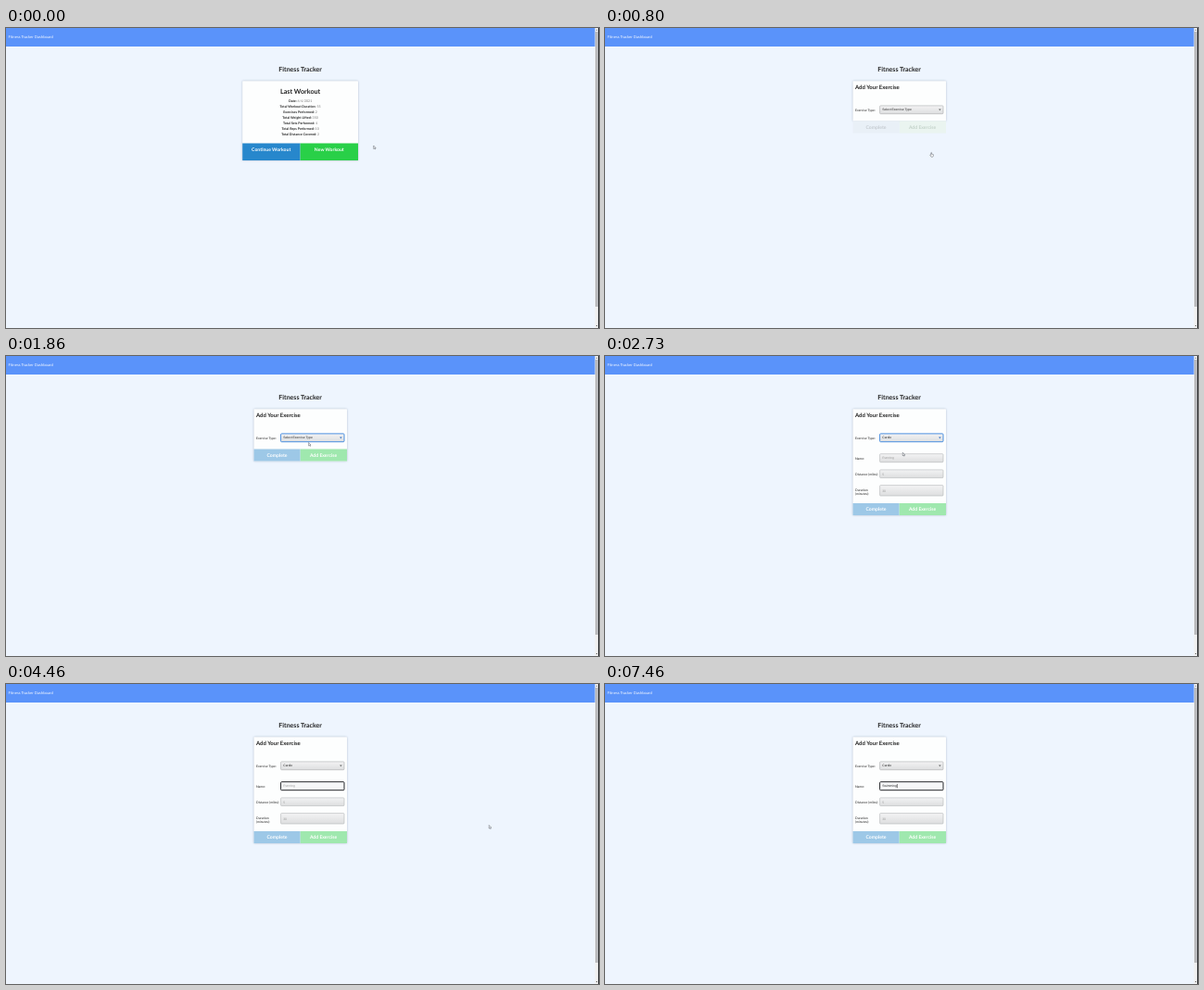
These frames come from a looping animation (640x324 px, 8 s). An HTML page:

```html
<!DOCTYPE html>
<html lang="en">
<head>
<meta charset="utf-8">
<title>Fitness Tracker</title>
<style>
  html, body { margin: 0; width: 100%; height: 100%; overflow: hidden; background: #eef5fe; }
  svg { display: block; width: 640px; height: 324px; }
  text { font-family: Lato, sans-serif; text-rendering: geometricPrecision; white-space: pre; }
  .field { font-family: "Liberation Sans", Arial, sans-serif; }
  .card { filter: drop-shadow(0 .4px .8px rgba(60, 80, 110, .35)); }
</style>
</head>
<body>
<svg id="stage" viewBox="0 0 640 324">
  <defs>
    <linearGradient id="shade" x2="0" y2="1">
      <stop stop-color="#f3f3f4"/><stop offset="1" stop-color="#dddedf"/>
    </linearGradient>
  </defs>
</svg>
<script>
const LOOP = 8000;
const stage = document.getElementById('stage');

function add(parent, tag, attrs, content) {
  const el = document.createElementNS('http://www.w3.org/2000/svg', tag);
  set(el, attrs);
  if (content !== undefined) el.textContent = content;
  parent.appendChild(el);
  return el;
}
function set(el, attrs) {
  for (const key in attrs) el.setAttribute(key, attrs[key]);
}
function show(el, on) {
  el.style.display = on ? '' : 'none';
}
const group = (parent, attrs = {}) => add(parent, 'g', attrs);
const rect = (parent, x, y, width, height, fill, more = {}) =>
  add(parent, 'rect', { x, y, width, height, fill, ...more });

// y is the middle of the capital letters
const label = (parent, x, y, size, str, more = {}) =>
  add(parent, 'text', { x, y: y + size * 0.36, 'font-size': size, fill: '#222', ...more }, str);
const bold = { 'font-weight': 700 };
const mid = { 'text-anchor': 'middle' };
const fieldText = (parent, y, str, fill) =>
  label(parent, 299.2, y, 3.4, str, { class: 'field', fill });
const box = (parent, y, height) =>
  rect(parent, 296.6, y, 68.4, height, 'url(#shade)', { rx: 0.9, stroke: '#b3b5b8', 'stroke-width': 0.6 });

// Page frame
rect(stage, 0, 0, 640, 324, '#eef5fe');
rect(stage, 0, 0, 636, 20, '#5a93fa');
label(stage, 2.5, 9, 4.2, 'Fitness Tracker Dashboard', { fill: '#f4f8ff' });
label(stage, 317.6, 44.5, 7, 'Fitness Tracker', { ...bold, ...mid });
rect(stage, 635.6, 0, 4.4, 324, '#f0f0f1');
rect(stage, 636, 4, 2.8, 297, '#b9babd');
rect(stage, 639.1, 0, 0.9, 324, '#25272b');
add(stage, 'path', { d: 'M636.6 2.6l.9-1.2.9 1.2zM636.6 321l.9 1.2.9-1.2z', fill: '#555' });

// Last workout
const home = group(stage);
const homeCard = group(home, { class: 'card' });
rect(homeCard, 255.2, 57.3, 124.8, 85.7, '#fdfefe', { rx: 0.8 });
rect(homeCard, 255.2, 124.5, 62.4, 18.5, '#2787cc');
rect(homeCard, 317.6, 124.5, 62.4, 18.5, '#29d048');
label(home, 317.6, 68.5, 7.2, 'Last Workout', { ...bold, ...mid });
[
  ['Date', '6/4/2021'],
  ['Total Workout Duration', '55'],
  ['Exercises Performed', '2'],
  ['Total Weight Lifted', '350'],
  ['Total Sets Performed', '4'],
  ['Total Reps Performed', '10'],
  ['Total Distance Covered', '2'],
].forEach(([name, value], i) => {
  const row = label(home, 317.6, 78.6 + i * 6, 3.6, '', mid);
  add(row, 'tspan', bold, name + ': ');
  add(row, 'tspan', { fill: '#777' }, value);
});
const white = { ...bold, ...mid, fill: '#fff' };
label(home, 286.2, 131, 5.1, 'Continue Workout', white);
label(home, 348.8, 131, 5.1, 'New Workout', white);

// Add exercise
const form = group(stage);
const formCard = group(form, { class: 'card' });
const sheet = rect(formCard, 267.5, 57.3, 100.5, 56, '#fdfefe', { rx: 0.8 });
const buttons = group(form);
const blue = rect(buttons, 267.5, 100.5, 50.2, 13);
const green = rect(buttons, 317.7, 100.5, 50.3, 13);
const complete = label(buttons, 292.5, 107, 5.1, 'Complete', white);
const addMore = label(buttons, 342.5, 107, 5.1, 'Add Exercise', white);
label(form, 270, 63.7, 6, 'Add Your Exercise', bold);
label(form, 270, 88.4, 3.5, 'Exercise Type:');
const select = box(form, 83.9, 8.8);
const choice = fieldText(form, 88.1, '', '#222');
const arrow = add(form, 'path', { d: 'M360.1 87.5h2.6l-1.3 1.7z' });

const cardio = group(form);
label(cardio, 270, 110.6, 3.5, 'Name:');
label(cardio, 270, 127.4, 3.5, 'Distance (miles):');
label(cardio, 270, 144.4, 3.5, 'Duration');
label(cardio, 270, 149, 3.5, '(minutes):');
const nameBox = box(cardio, 105.7, 9);
box(cardio, 122.9, 8.7);
box(cardio, 139.6, 11.4);
const nameText = fieldText(cardio, 110.2, '');
fieldText(cardio, 127.3, '5', '#999');
fieldText(cardio, 145.4, '30', '#999');
const caret = rect(cardio, 299, 108, 0.5, 4.4, '#111');

// Pointer shapes, with the hot spot at 0,0
const pointer = group(stage, { fill: '#fff', stroke: '#333a44', 'stroke-width': 0.4 });
const shapes = {
  arrow: add(pointer, 'path', { d: 'M0 0V3.5L.8 2.8 1.4 4 2 3.7 1.5 2.6H2.5z' }),
  hand: add(pointer, 'path', { d: 'M-.2.3Q.2-.3.6.3V1.8L2.4 2.2V3.6L1.8 4.8H0L-1.2 2.8-.7 2.4-.2 2.9z' }),
  beam: add(pointer, 'path', { d: 'M-.6.2H.6M0 .2V4M-.6 4H.6', fill: 'none' }),
};

// start, end, from, to
const moves = [
  [60, 600, [396.7, 127], [352, 134.4]],
  [1200, 1800, [352, 134.4], [326.6, 93.5]],
  [2730, 2730, [326.6, 93.5], [321.3, 104.2]],
  [3400, 3870, [321.3, 104.2], [521.3, 152.5]],
];
const WORD = 'Swimming';
const keys = [5860, 6260, 6460, 6660, 6860, 7000, 7200, 7460];
const STEP = 67;

function pointerAt(t) {
  let move = moves[0];
  for (const m of moves) if (t >= m[0]) move = m;
  const [start, end, from, to] = move;
  const run = Math.floor((t - start) / STEP + 1) * STEP;
  const p = t < start ? 0 : t >= end ? 1 : Math.min(1, run / (end - start));
  const e = p * p * (3 - 2 * p);
  return from.map((v, i) => v + (to[i] - v) * e);
}

function drawButtons(t, open) {
  const faint = t < 930;
  set(buttons, { transform: `translate(0 ${open ? 58.5 : 0})` });
  set(blue, { fill: faint ? '#e9f0f7' : '#9dc8e7' });
  set(green, { fill: faint ? '#eaf4f0' : '#9fe8ae' });
  set(complete, { fill: faint ? '#c5cbd1' : '#fff' });
  set(addMore, { fill: faint ? '#c3d2c9' : '#fff' });
}

function drawForm(t) {
  const open = t >= 2730;
  const selectFocus = t >= 1800 && t < 3400;
  const nameFocus = t >= 3400;
  const typed = keys.filter(k => t >= k).length;

  set(sheet, { height: open ? 114.7 : t < 930 ? 43.2 : 56.2 });
  drawButtons(t, open);
  choice.textContent = open ? 'Cardio' : 'Select Exercise Type';
  set(select, selectFocus
    ? { stroke: '#4a8fe0', 'stroke-width': 1 }
    : { stroke: '#a9abae', 'stroke-width': 0.6 });
  set(arrow, { fill: selectFocus ? '#2f6fc4' : '#666' });

  show(cardio, open);
  set(nameBox, nameFocus
    ? { fill: '#f6f7f8', stroke: '#25272b', 'stroke-width': 1 }
    : { fill: 'url(#shade)', stroke: '#b3b5b8', 'stroke-width': 0.6 });
  nameText.textContent = typed ? WORD.slice(0, typed) : 'Running';
  set(nameText, { fill: typed ? '#222' : '#999' });

  const blinkOn = Math.floor((t - 3400) / 532) % 2 === 0;
  show(caret, nameFocus && (typed > 0 || blinkOn));
  set(caret, { x: typed && open ? 299.3 + nameText.getComputedTextLength() : 299 });
}

function draw(t) {
  const onForm = t >= 800;
  show(home, !onForm);
  show(form, onForm);
  if (onForm) drawForm(t);

  const [x, y] = pointerAt(t);
  const kind = t < 1200 && x < 380 ? 'hand' : t >= 3000 && t < 3400 ? 'beam' : 'arrow';
  for (const k in shapes) show(shapes[k], k === kind);
  set(pointer, { transform: `translate(${x} ${y})` });
  show(pointer, t < keys[0]);
}

const begin = performance.now();
function tick() {
  draw((performance.now() - begin) % LOOP);
  requestAnimationFrame(tick);
}
tick();
</script>
</body>
</html>
```
